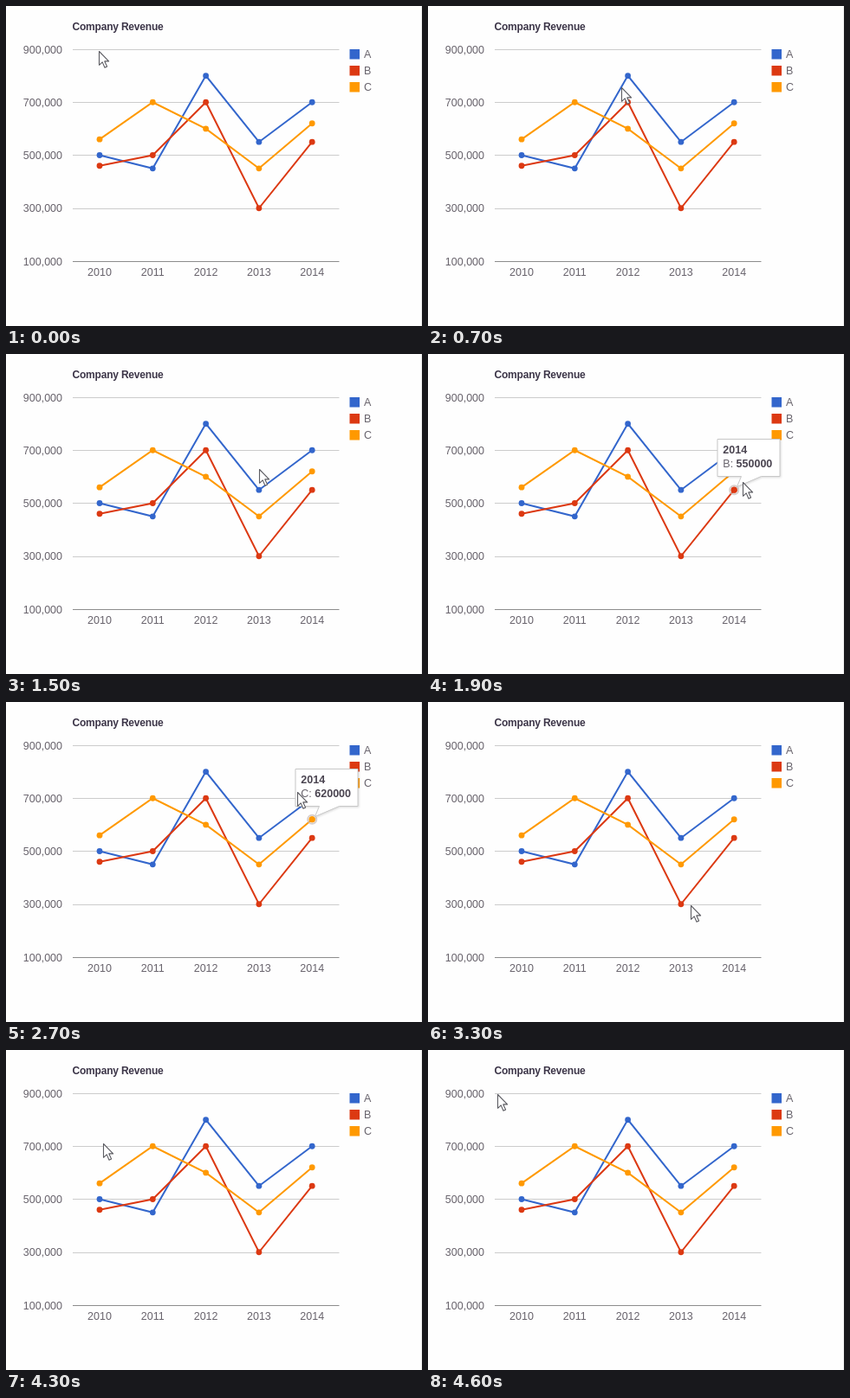
Recreate the animation shown at these times as an HTML page. Size 480 px wide and 370 px high, loop 7.6 s.

```html
<!DOCTYPE html>
<html lang="en">
<head>
<meta charset="utf-8">
<title>Company Revenue</title>
<style>
  html, body { margin: 0; width: 100%; height: 100%; overflow: hidden; background: #fefefe; }
  svg { display: block; width: 480px; height: 370px; }
  text { font: 12.5px "Liberation Sans", Arial, sans-serif; fill: #68636c; white-space: pre; }
  .title { font-size: 12px; font-weight: bold; letter-spacing: -.2px; fill: #3c3548; }
  .end { text-anchor: end; }
  .mid { text-anchor: middle; }
  .bold { font-weight: bold; fill: #4a4450; }
  .series { fill: none; stroke-width: 2; }
  .tip { opacity: 0; }
  .box { fill: #fff; stroke: #c8c8c8; filter: drop-shadow(1px 1px 1px #0002); }
  .ring { fill: none; stroke: #c9bdb9; stroke-opacity: .75; stroke-width: 2; }
  .cursor { fill: #fff; stroke: #5c5c62; stroke-width: 1.1; stroke-linejoin: round; }
</style>
</head>
<body>
<svg viewBox="0 0 480 370">
  <path d="M479.5 0V370" stroke="#e9e9e9"/>
  <text class="title" x="76.5" y="28">Company Revenue</text>
  <g id="chart"></g>
  <path id="cursor" class="cursor" d="M.5 .5V16.3L4.2 12.9L7 19.2L9.6 18L6.8 11.9H11.6Z"/>
</svg>
<script>
const LOOP = 7600, STEP = 100;
const series = [
  { name: "A", color: "#3366cc", values: [500, 450, 800, 550, 700] },
  { name: "B", color: "#dc3912", values: [460, 500, 700, 300, 550] },
  { name: "C", color: "#ff9900", values: [560, 700, 600, 450, 620] }
];
const chart = document.getElementById("chart");
const px = i => 108 + i * 61.3;
const py = v => 295 - (v - 100) * 245 / 800;

function add(parent, tag, attrs, text = "") {
  const el = document.createElementNS("http://www.w3.org/2000/svg", tag);
  for (const key in attrs) el.setAttribute(key, attrs[key]);
  el.textContent = text;
  return parent.appendChild(el);
}

function play(el, frames) {
  el.animate(frames, { duration: LOOP, iterations: Infinity, delay: -1 });
}

function drawAxes() {
  for (let v = 900; v >= 100; v -= 200) {
    const y = Math.floor(py(v) + 0.3) + 0.5;
    add(chart, "path", { d: `M77 ${y}H384.5`, stroke: v === 100 ? "#8c8c8c" : "#ccc" });
    add(chart, "text", { class: "end", x: 65, y: py(v) + 4.7 }, v + ",000");
  }
  for (let i = 0; i < 5; i++) {
    add(chart, "text", { class: "mid", x: px(i), y: 312 }, 2010 + i);
  }
}

function drawSeries({ name, color, values }, n) {
  const points = values.map((v, i) => [px(i), py(v)]);
  const y = 50 + n * 19;
  add(chart, "polyline", { class: "series", stroke: color, points: points.join(" ") });
  for (const [cx, cy] of points) add(chart, "circle", { cx, cy, r: 3.4, fill: color });
  add(chart, "rect", { x: 396.5, y, width: 11.5, height: 11.5, fill: color });
  add(chart, "text", { x: 413, y: y + 10 }, name);
}

// Tooltip for the last year of a series, visible from one time to another
function tooltip({ name, color, values }, from, to) {
  const tip = add(chart, "g", { class: "tip" });
  const cx = px(4), cy = py(values[4]);
  const top = Math.round(cy) - 58.5, bottom = top + 43;
  add(tip, "circle", { class: "ring", cx, cy, r: 5 });
  add(tip, "circle", { cx, cy, r: 3.6, fill: color });
  add(tip, "path", { class: "box", d: `M334 ${top}H406V${bottom}H384.5L356.5 ${bottom + 12}L361.5 ${bottom}H334Z` });
  add(tip, "text", { class: "bold", x: 340.3, y: top + 16.5 }, "2014");
  const label = add(tip, "text", { x: 340.3, y: top + 32.5 }, name + ": ");
  add(label, "tspan", { class: "bold" }, values[4] + "000");
  const key = (t, opacity) => ({ offset: t / LOOP, opacity, easing: "step-end" });
  play(tip, [key(0, 0), key(from, 1), key(to, 0), key(LOOP, 0)]);
}

// The pointer glides between a few stops and rests for one step at each pause
function movePointer() {
  const stops = [
    [0, 107, 52], [200, 207, 66], [1200, 239, 122], [1900, 363, 148], [2700, 336, 104],
    [3300, 303, 235], [3800, 166, 202], [4600, 80, 51], [LOOP, 80, 51]
  ];
  const pauses = [300, 800, 1600, 2200, 2600, 3100, 4200, 4400];
  const frames = [];
  for (let t = 0; t <= LOOP; t += STEP) {
    const time = pauses.includes(t) ? t - STEP : t;
    const n = Math.max(1, stops.findIndex(stop => stop[0] >= time));
    const [t0, x0, y0] = stops[n - 1], [t1, x1, y1] = stops[n];
    const k = (time - t0) / (t1 - t0);
    const x = Math.round(x0 + (x1 - x0) * k), y = Math.round(y0 + (y1 - y0) * k);
    frames.push({ offset: t / LOOP, transform: `translate(${x}px, ${y}px)`, easing: "step-end" });
  }
  play(document.getElementById("cursor"), frames);
}

drawAxes();
series.forEach(drawSeries);
tooltip(series[1], 1800, 2400);
tooltip(series[2], 2400, 2800);
movePointer();
</script>
</body>
</html>
```
